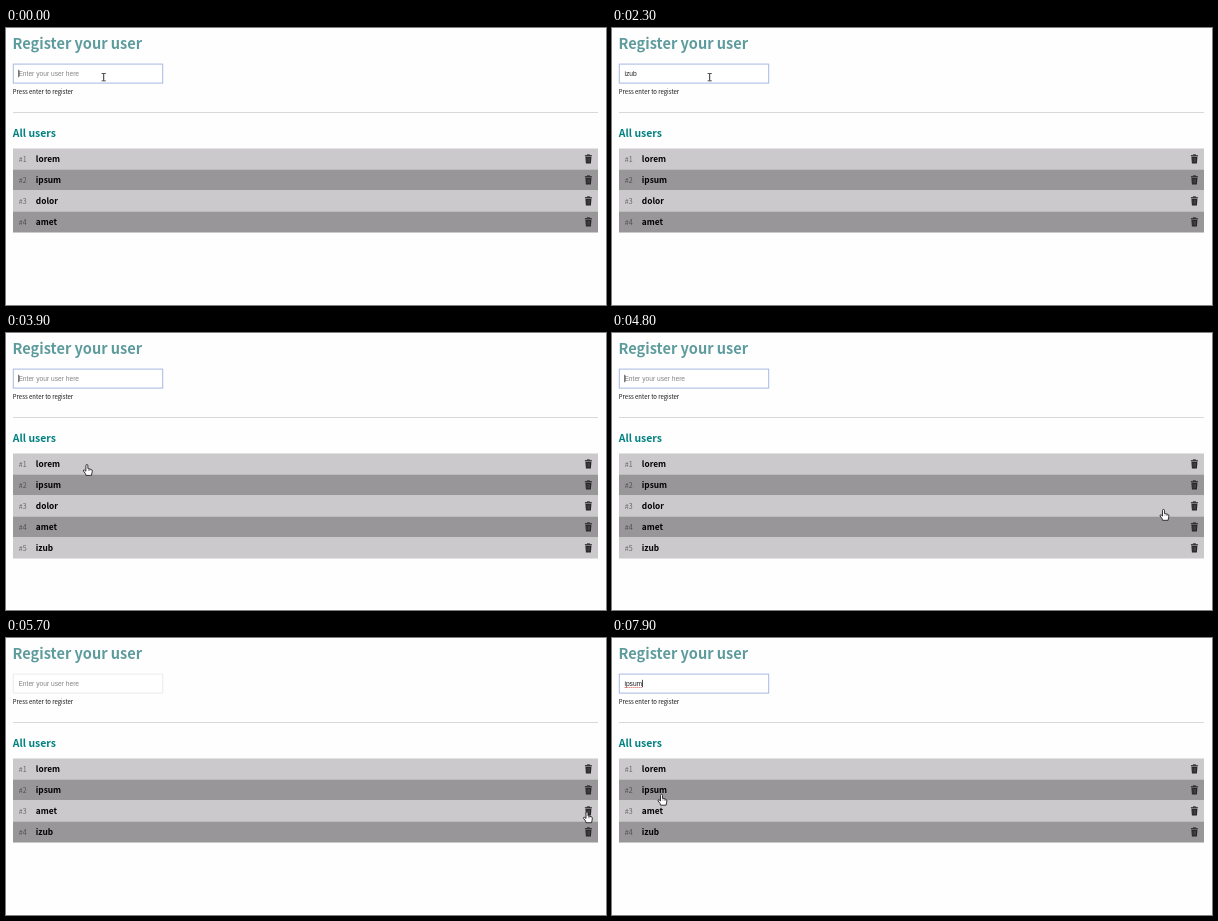
These frames come from a looping animation (600 by 277 pixels, 8 s). An HTML page with a canvas:

```html
<!DOCTYPE html>
<html lang="en">
<head>
<meta charset="utf-8">
<title>Register your user</title>
<style>
  html, body { margin: 0; width: 100%; height: 100%; overflow: hidden; background: #fefefe; }
  canvas { display: block; width: 600px; height: 277px; }
</style>
</head>
<body>
<canvas id="stage" width="600" height="277"></canvas>
<script>
const ctx = document.getElementById('stage').getContext('2d');
const LOOP = 8000, TICK = 100;
const SANS = '"Noto Sans CJK JP", "Noto Sans CJK SC", "Noto Sans CJK", "Noto Sans", sans-serif';
const FIELD_FONT = '6.67px "Liberation Sans", Arial, sans-serif';
const NEW_USER = 'izub';
const TYPE_START = 300, KEY_DELAY = 400, BLINK = 530;
const SUBMIT = 2600, BLUR = 5400, REMOVE = 5500, EDIT = 7500;
const LIST_TOP = 120.5, ROW = 21;

const point = (x, y) => ({ x, y });
const FIELD = point(97, 49), LIST = point(85, 152), TRASH = point(581, 174), NAME = point(49.5, 156.5);

// Each move is a quadratic curve, run at constant parameter speed
const MOVES = [
  { start: 3600, end: 4000, from: FIELD, bend: point(72, 115), to: LIST },
  { start: 4000, end: 4850, from: LIST, bend: point(330, 198), to: TRASH },
  { start: 5700, end: 7100, from: TRASH, bend: point(49.5, 182), to: NAME }
];

function pointerAt(t) {
  const move = MOVES.filter(m => t >= m.start).pop() || MOVES[0];
  const p = Math.max(0, Math.min(1, (t - move.start) / (move.end - move.start)));
  const q = 1 - p;
  const curve = axis => q * q * move.from[axis] + 2 * p * q * move.bend[axis] + p * p * move.to[axis];
  return point(curve('x'), curve('y'));
}

function rect(x, y, w, h, color) {
  ctx.fillStyle = color;
  ctx.fillRect(x, y, w, h);
}

function text(str, x, y, font, color) {
  ctx.font = font;
  ctx.fillStyle = color;
  ctx.fillText(str, x, y);
}

function usersAt(t) {
  const users = ['lorem', 'ipsum', 'dolor', 'amet'];
  if (t >= SUBMIT) users.push(NEW_USER);
  return t >= REMOVE ? users.filter(u => u !== 'dolor') : users;
}

function fieldText(t) {
  if (t >= EDIT) return 'ipsum';
  if (t >= SUBMIT || t < TYPE_START) return '';
  return NEW_USER.slice(0, 1 + Math.floor((t - TYPE_START) / KEY_DELAY));
}

function caretOn(t) {
  if (t >= EDIT) return true;
  if (t >= BLUR) return false;
  if (t >= SUBMIT) return Math.floor((t - SUBMIT) / BLINK) % 2 === 0;
  return t < TYPE_START + 4 * KEY_DELAY;
}

function drawField(t) {
  const focused = t < BLUR || t >= EDIT;
  const value = fieldText(t);
  rect(7, 36, 150, 19.5, '#fff');
  ctx.lineWidth = 1;
  ctx.strokeStyle = focused ? '#a6b8e4' : '#ebebeb';
  ctx.strokeRect(7.3, 36.1, 149.4, 19);
  text(value || 'Enter your user here', 12.4, 48, FIELD_FONT, value ? '#222' : '#858585');
  const end = 12.4 + ctx.measureText(value).width;
  if (t >= EDIT) {
    for (let x = 12.5; x < end; x += 2) rect(x, 49, 1.3, 1, '#e07a7a');
  }
  if (caretOn(t)) rect(end, 41.8, 0.8, 7.4, '#222');
}

function drawTrash(y) {
  const x = 582.4;
  rect(x - 1.5, y - 4.7, 3, 1, '#262626');
  rect(x - 3.5, y - 3.9, 7, 1.1, '#262626');
  ctx.beginPath();
  ctx.moveTo(x - 3, y - 2.3);
  ctx.lineTo(x + 3, y - 2.3);
  ctx.lineTo(x + 2.5, y + 4.3);
  ctx.lineTo(x - 2.5, y + 4.3);
  ctx.fill();
  for (let i = -1; i <= 1; i++) {
    rect(x + i * 1.4 - 0.2, y - 1.3, 0.4, 4.5, 'rgba(200, 200, 200, 0.4)');
  }
}

function drawRow(name, i) {
  const top = LIST_TOP + i * ROW, even = i % 2;
  rect(7, top, 585, ROW, even ? '#989698' : '#cbc9cb');
  text('#' + (i + 1), 12.8, top + 13.5, '7.1px ' + SANS, even ? '#505050' : '#666');
  text(name, 29.8, top + 13.8, 'bold 8.33px ' + SANS, '#000');
  drawTrash(top + 10.6);
}

const HAND = new Path2D('M-1 1Q-1-.2 0-.2Q1-.2 1 1V3.9L4.6 4.8Q5.5 5.2 5.4 6.5L4.6 10.7H-1L-1.4 9L-3.5 6.3Q-3.6 5-2.4 5.3L-1 6.5Z');
const ARROW = new Path2D('M0 0V9L2 7L3.5 10L5 9.5L3.6 6.5H6.4Z');

function drawBeam(x, y) {
  rect(x + 0.2, y - 3.2, 1, 7, '#333');
  for (const dy of [-4, 3.4]) rect(x - 1.4, y + dy, 4.2, 0.9, '#444');
}

function drawPointer(t) {
  const { x, y } = pointerAt(t);
  if (y < 56) return drawBeam(x, y);
  const overRow = y >= LIST_TOP;
  const shape = overRow ? HAND : ARROW;
  ctx.save();
  ctx.translate(x, y);
  ctx.lineWidth = 0.9;
  ctx.lineJoin = 'round';
  ctx.fillStyle = overRow ? '#fff' : '#111';
  ctx.strokeStyle = overRow ? '#222' : '#fff';
  ctx.fill(shape);
  ctx.stroke(shape);
  if (overRow) {
    for (let i = 0; i < 3; i++) rect(1.2 + i * 1.4, 4.6, 0.5, 1.7, '#666');
  }
  ctx.restore();
}

function draw(t) {
  rect(0, 0, 600, 277, '#fefefe');
  text('Register your user', 6.6, 20.7, 'bold 14.55px ' + SANS, '#5d9b9d');
  drawField(t);
  text('Press enter to register', 6.8, 66, '5.97px ' + SANS, '#111');
  rect(7, 84, 585, 1, '#d8d8d8');
  text('All users', 6.8, 109, 'bold 10.45px ' + SANS, '#008080');
  usersAt(t).forEach(drawRow);
  drawPointer(t);
}

const start = performance.now();
function frame() {
  const t = (performance.now() - start) % LOOP;
  draw(Math.floor(t / TICK) * TICK);
  requestAnimationFrame(frame);
}
frame();
</script>
</body>
</html>
```
